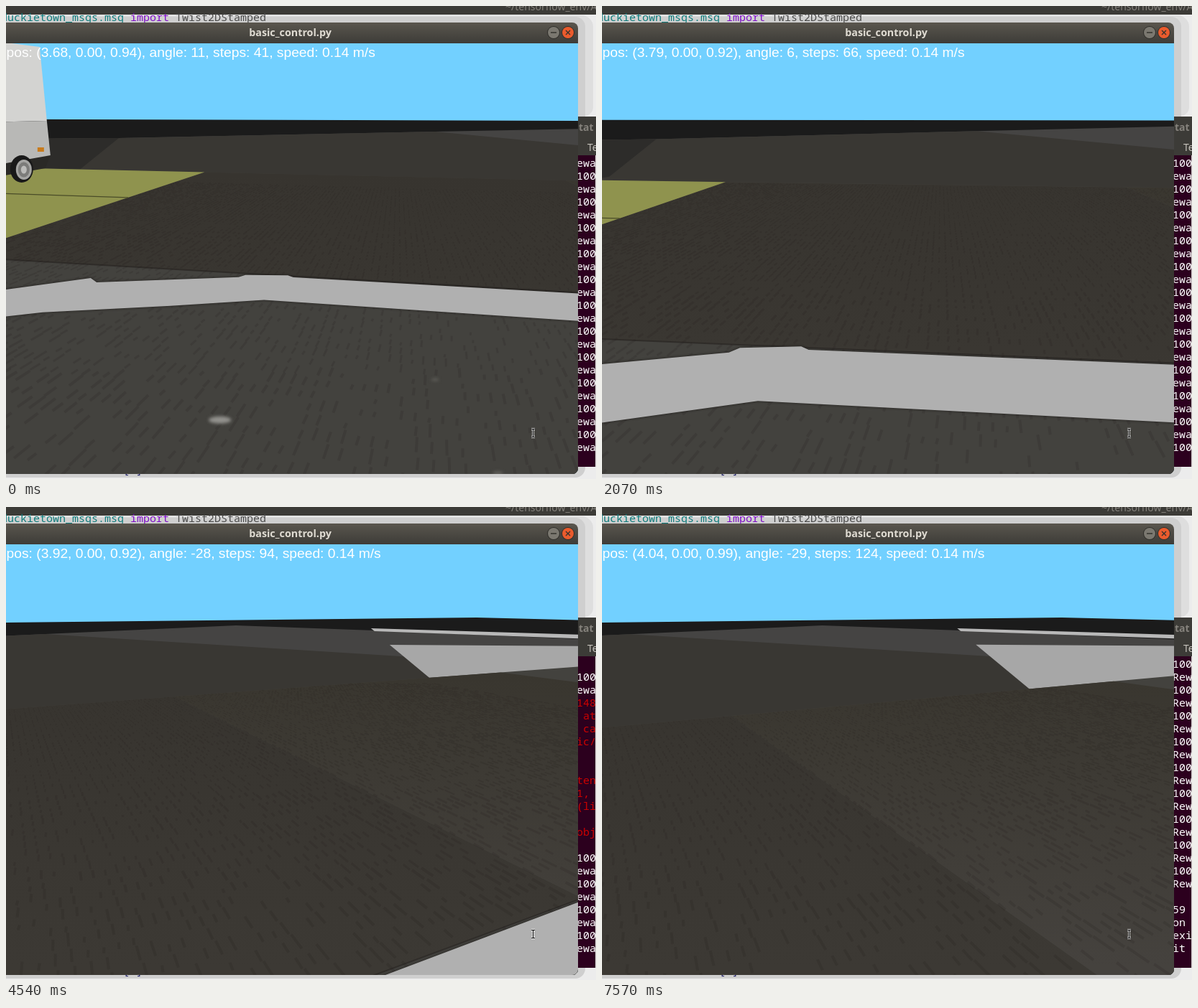
These frames come from a looping animation (821 px wide and 659 px high, 8000 ms). An HTML page with a canvas:

```html
<!DOCTYPE html>
<html lang="en">
<head>
<meta charset="utf-8">
<title>basic_control.py</title>
<style>
  html, body { margin: 0; width: 100%; height: 100%; overflow: hidden; background: #ececec; }
  canvas { display: block; }
</style>
</head>
<body>
<canvas id="stage" width="821" height="659"></canvas>
<script>
const ctx = document.getElementById('stage').getContext('2d');
const LOOP = 8000;
const MONO = '15px "Noto Sans Mono", monospace';
const SANS = '14px "Noto Sans", sans-serif';

// The picture is held for 120 ms, and for 150 ms after each of these runs
const RUNS = [1, 1, 5, 7, 2, 3, 3, 1, 1, 4, 5, 3, 1, 1, 3, 1, 1, 4, 5, 3, 2, 1];
const ticks = [];
let next = 0;
for (const run of RUNS) {
  for (let i = 0; i < run; i++) ticks.push(next + 120 * i);
  next += 120 * run + 30;
}

// Pinhole camera one unit above the ground; a road tile is 5.42 units wide
const CX = 396, CY = 352, FOCAL = 751, PITCH = 0.2726;
const COS = Math.cos(PITCH), SIN = Math.sin(PITCH);
const TILE = 5.42, SEAM = -5.22, LINE = -5.67;

const clamp = (v, a, b) => Math.max(a, Math.min(b, v));

// Straight runs between [position, value] points
function path(s, ...pts) {
  let i = 0;
  while (i < pts.length - 2 && s > pts[i + 1][0]) i++;
  const [a, b] = [pts[i], pts[i + 1]];
  return a[1] + (b[1] - a[1]) * clamp((s - a[0]) / (b[0] - a[0]), 0, 1);
}

let cam;

function stateAt(time) {
  const pause = clamp(time - 4083, 0, 110);
  const step = Math.min(124, 41 + 0.012 * (time - pause));
  const yaw = path(step, [41, 10.9], [52, 8.3], [66, 5.5], [82, 8.45], [94, -27.6], [104, -30.55], [124, -28.6]);
  const turn = yaw * Math.PI / 180;
  return {
    step, yaw, c: Math.cos(turn), s: Math.sin(turn),
    x: path(step, [41, -8.34], [82, -6.66], [94, -6.27], [124, -5.25]),
    z: path(step, [41, -2.4], [82, -2.47], [94, -1.73], [124, -1.15]),
    posX: path(step, [41, 3.68], [94, 3.9185], [124, 4.0385]),
    posZ: path(step, [41, 0.94], [82, 0.909], [94, 0.9177], [124, 0.9927]),
  };
}

// Ground point to camera space: right, depth, up
function view(x, z) {
  const dx = x - cam.x, dz = z - cam.z;
  const ahead = dx * cam.c - dz * cam.s;
  return [dx * cam.s + dz * cam.c, ahead * COS + SIN, ahead * SIN - COS];
}
const toScreen = ([x, depth, up]) => [CX + FOCAL * x / depth, CY - FOCAL * up / depth];

// Ground polygon on screen, cut at the near plane
function flat(pts) {
  const NEAR = 0.2, out = [], v = pts.map(p => view(...p));
  v.forEach((b, i) => {
    const a = v[(i || v.length) - 1];
    if ((a[1] < NEAR) !== (b[1] < NEAR)) {
      const f = (NEAR - a[1]) / (b[1] - a[1]);
      out.push(a.map((n, k) => n + (b[k] - n) * f));
    }
    if (b[1] >= NEAR) out.push(b);
  });
  return out.map(toScreen);
}

// Distant points, written as screen places at one heading, only turn with the camera
const distant = heading => (x, y) => {
  const d = (heading - cam.yaw) * Math.PI / 180;
  const u = (x - CX) / FOCAL, v = (CY - y) / FOCAL;
  const fwd = COS + v * SIN, up = v * COS - SIN;
  const ahead = u * Math.sin(d) + fwd * Math.cos(d);
  const depth = Math.max(0.05, ahead * COS - up * SIN);
  return toScreen([u * Math.cos(d) - fwd * Math.sin(d), depth, ahead * SIN + up * COS]);
};
const early = distant(10.9), late = distant(-27.6);

function shape(color, pts) {
  ctx.beginPath();
  pts.forEach(p => ctx.lineTo(...p));
  ctx.fillStyle = color;
  ctx.fill();
}
function below(color, pts) {
  shape(color, [[-50, 700], [-50, pts[0][1]], ...pts, [850, pts[pts.length - 1][1]], [850, 700]]);
}
const tile = (x0, x1, z0, z1) => flat([[x0, z0], [x1, z0], [x1, z1], [x0, z1]]);

function crease(x, z0, z1, color, width) {
  ctx.beginPath();
  flat([[x, z0], [x, z1]]).forEach(p => ctx.lineTo(...p));
  ctx.strokeStyle = color;
  ctx.lineWidth = width;
  ctx.stroke();
}
function oval(color, x, y, rx, ry) {
  ctx.beginPath();
  ctx.ellipse(x, y, rx, ry, 0, 0, 7);
  ctx.fillStyle = color;
  ctx.fill();
}
function fade(top, bottom) {
  const g = ctx.createLinearGradient(0, 235, 0, 640);
  g.addColorStop(0, top);
  g.addColorStop(1, bottom);
  return g;
}

function backdrop() {
  ctx.fillStyle = '#72d0ff';
  ctx.fillRect(0, 52, 796, 600);
  const corner = early(157, 184), ridge = early(597, 175), left = early(-300, 188);
  below('#1b1b1b', [early(-300, 157), early(480, 159), late(655, 154), late(1100, 165)]);
  below('#454443', [left, corner, ridge, late(320, 165), late(512, 172), late(1100, 197)]);
  below('#393733', [left, corner, ridge, late(549, 208), late(1100, 258)]);
  shape('#2d2c2a', [left, corner, early(95, 234), early(-300, 300)]);
  shape('#b8b8b8', [late(508, 169), late(1100, 187), late(1100, 194), late(513, 173)]);
  shape('#a7a7a7', [late(534, 192), late(1100, 196), late(1100, 290), late(640, 280)]);
}

function hash(i, j) {
  let h = Math.imul(i, 374761393) ^ Math.imul(j, 668265263);
  h = Math.imul(h ^ (h >>> 13), 1274126177);
  return ((h ^ (h >>> 16)) >>> 0) / 4294967296;
}

// Short threads lying on the road, fixed to the world
function weave() {
  const LONG = 0.085, WIDE = 0.045, REACH = 3.6;
  const midX = cam.x + REACH * cam.c, midZ = cam.z - REACH * cam.s;
  const bands = [2.1, 3, 4.5, 7.5].map(far => ({ far, lines: new Path2D() }));
  for (let i = Math.floor((midX - REACH) / LONG); i * LONG < Math.min(0, midX + REACH); i++) {
    for (let j = Math.floor((midZ - REACH) / WIDE); j * WIDE < midZ + REACH; j++) {
      const r = hash(i, j);
      if (r < 0.35) continue;
      const a = view(i * LONG, j * WIDE);
      const band = a[1] > 1 && bands.find(b => a[1] < b.far);
      if (!band) continue;
      const p = toScreen(a);
      if (p[0] < -20 || p[0] > 820) continue;
      band.lines.moveTo(...p);
      band.lines.lineTo(...toScreen(view((i + r) * LONG, (j + 0.12) * WIDE)));
    }
  }
  bands.forEach(({ lines }, n) => {
    ctx.strokeStyle = 'rgba(24,21,16,.13)';
    ctx.lineWidth = [4, 3, 2, 1.2][n];
    ctx.stroke(lines);
  });
}

function truck() {
  const anchor = view(-1.6, -7.51), [x, y] = toScreen(anchor);
  if (x < -80) return;
  const size = 7.577 / anchor[1];
  ctx.save();
  ctx.translate(x, y);
  ctx.scale(size, size);
  ctx.translate(-25, -245);
  shape('#2a2926', [[-40, 205], [62, 207], [55, 226], [-40, 243]]);
  shape('#d3d3d1', [[-40, 46], [47, 57], [57, 160], [-40, 162]]);
  shape('#b8b8b6', [[-40, 162], [57, 160], [62, 208], [-40, 226]]);
  oval('#191919', 22, 227, 16, 19);
  oval('#a5a5a3', 25, 228, 11, 14);
  oval('#7c7c7a', 25, 228, 8, 10.5);
  oval('#bcbcba', 25, 228, 4, 5.5);
  ctx.fillStyle = '#c87b1c';
  ctx.fillRect(44, 197, 9, 6);
  ctx.restore();
}

function paintedLine() {
  ctx.save();
  ctx.shadowColor = 'rgba(28,26,23,.9)';
  ctx.shadowBlur = 4;
  shape('#b0b0b0', flat([
    [-6.3, -5.2], [-5.73, -4.49], [-5.49, -4.19], [-5.56, -4.11], [-5.3, -3.31], [-5.25, -3.28],
    [-5.21, -3.02], [-5.24, -2.98], [SEAM, 4], [LINE, 4], [LINE, -3.06], [-5.85, -3.52], [-6.06, -4.12], [-6.7, -5.2],
  ]));
  ctx.restore();
}

function road() {
  shape('#43423e', tile(-20, 0, -20, 20));
  shape(fade('#37342f', '#3c3934'), tile(SEAM, 0, -TILE, 0));
  shape(fade('#39362f', '#45423e'), tile(SEAM, 0, 0, TILE));
  weave();
  crease(SEAM, -TILE, 4, 'rgba(32,29,26,.5)', 2);
  shape('#8f934e', tile(SEAM, 0, -20, -TILE));
  crease(-2.6, -20, -TILE, '#4a4c28', 1.2);
  paintedLine();
  ctx.save();
  ctx.filter = 'blur(2px)';
  [[-6.83, -2.93, 28], [-6.41, -2.21, 11], [-6.94, -2.07, 11]].forEach(([x, z, size]) => {
    const spot = view(x, z);
    if (spot[1] > 0.5) oval(size > 20 ? '#92918d' : '#65645f', ...toScreen(spot), size / spot[1], size / spot[1] * 0.32);
  });
  ctx.restore();
}

function text(str, x, y, color, font) {
  ctx.font = font;
  ctx.fillStyle = color;
  ctx.fillText(str, x, y);
}

// Terminal output, with the line count reached after each step
const rows = [], ends = {};
const FAULT = ['148', ' at', ' ca', 'ic/', '', '', 'ten', '1, ', '(li', '', 'obj', ''];
for (let k = 20; k <= 124; k++) {
  if (k === 90) rows.push(['']);
  if (k === 91) FAULT.forEach(s => rows.push([s, '#cc0000']));
  rows.push(['100'], [k < 99 ? 'ewa' : 'Rew']);
  ends[k] = rows.length;
}
['', '59 ', 'on ', 'exi', 'it '].forEach(s => rows.push([s]));

function terminal(time) {
  ctx.fillStyle = '#3c3b37';
  ctx.fillRect(790, 154, 31, 54);
  text('tat', 797, 174, '#85827c', 'bold ' + SANS);
  text('Te', 809, 202, '#c5c2bb', SANS);
  ctx.fillStyle = '#2c001e';
  ctx.fillRect(790, 208, 30, 434);
  ctx.fillStyle = '#cfcccb';
  ctx.fillRect(820, 208, 1, 434);
  const k = Math.floor(cam.step);
  const half = cam.step - k > 0.75 ? 1 : 0;
  const exit = clamp(Math.ceil((time - 7100) / 75), 0, 5);
  const end = ends[k] + half + exit;
  ctx.save();
  ctx.beginPath();
  ctx.rect(790, 208, 30, 434);
  ctx.clip();
  rows.slice(end - 23, end).forEach(([s, color = '#ffffff'], i) => text(s, 794, 224 + 18 * i, color, MONO));
  ctx.restore();
}

function panel(x, y, w, h, r, color) {
  ctx.beginPath();
  ctx.roundRect(x, y, w, h, r);
  ctx.fillStyle = color;
  ctx.fill();
}

function desktop(time) {
  ctx.fillStyle = '#ececec';
  ctx.fillRect(0, 0, 821, 659);
  panel(-20, 13, 837, 140, [0, 16, 12, 0], '#dedede');
  panel(-20, 15, 826, 642, 14, '#cfcfcf');
  ctx.fillStyle = '#3c3b37';
  ctx.fillRect(0, 0, 821, 12);
  text('~/tensorflow_env/AD-', 695, 6, '#85827c', SANS);
  text('duckietown_msgs.msg', -7, 21, '#107c7c', MONO);
  text('import', 173, 21, '#8010c8', MONO);
  text('Twist2DStamped', 236, 21, '#4c4c4c', MONO);
  terminal(time);
  text('[ ]', 163, 651, '#20206a', MONO);
}

function titleBar() {
  const g = ctx.createLinearGradient(0, 23, 0, 52);
  g.addColorStop(0, '#5a564e');
  g.addColorStop(1, '#3d3c38');
  panel(-10, 23, 806, 30, [0, 8, 0, 0], g);
  ctx.textAlign = 'center';
  text('basic_control.py', 395.5, 42, '#dfdbd2', 'bold 14.3px "Noto Sans", sans-serif');
  ctx.textAlign = 'left';
  [[762, '#7b7870'], [782, '#ea5b2d']].forEach(([x, color]) => {
    oval('#2f2e2a', x, 37, 9, 9);
    oval(color, x, 37, 8, 8);
  });
  ctx.strokeStyle = '#35332e';
  ctx.lineWidth = 1.4;
  ctx.beginPath();
  ctx.moveTo(758, 37); ctx.lineTo(766, 37);
  ctx.moveTo(779, 34); ctx.lineTo(785, 40);
  ctx.moveTo(785, 34); ctx.lineTo(779, 40);
  ctx.stroke();
}

function pointer() {
  [['#ffffff', 2.4], ['#000000', 1]].forEach(([color, width]) => {
    ctx.strokeStyle = color;
    ctx.lineWidth = width;
    ctx.beginPath();
    ctx.moveTo(731, 589.5); ctx.lineTo(736, 589.5);
    ctx.moveTo(733.5, 589.5); ctx.lineTo(733.5, 600.5);
    ctx.moveTo(731, 600.5); ctx.lineTo(736, 600.5);
    ctx.stroke();
  });
}

function draw(time) {
  cam = stateAt(time);
  desktop(time);
  titleBar();
  ctx.save();
  ctx.beginPath();
  ctx.roundRect(-10, 52, 806, 600, [0, 0, 8, 0]);
  ctx.clip();
  backdrop();
  road();
  truck();
  const label = `pos: (${cam.posX.toFixed(2)}, 0.00, ${cam.posZ.toFixed(2)}), angle: ${Math.round(cam.yaw)}, `
    + `steps: ${Math.round(cam.step)}, speed: 0.14 m/s`;
  text(label, 0.5, 71, '#ffffff', '19.25px "Liberation Sans", Arial, sans-serif');
  ctx.restore();
  pointer();
}

let shown = -1;
const start = performance.now();
function loop() {
  const t = (performance.now() - start) % LOOP;
  let i = ticks.length - 1;
  while (ticks[i] > t) i--;
  if (i !== shown) draw(ticks[shown = i]);
  requestAnimationFrame(loop);
}
loop();
</script>
</body>
</html>
```
